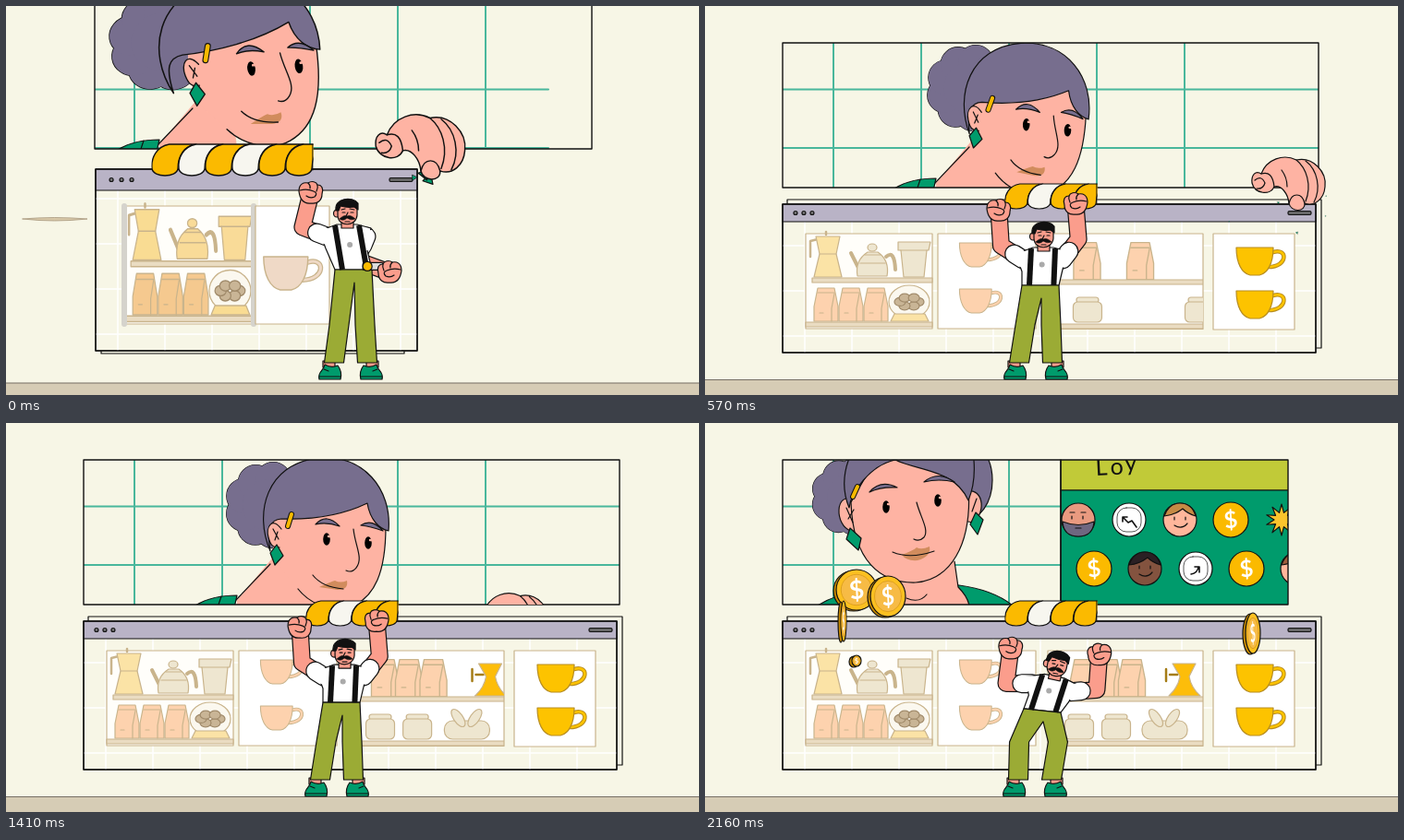
Recreate the animation shown at these times as an HTML page. Size 750 by 422 pixels, loop 2190 ms.

```html
<!DOCTYPE html>
<html lang="en">
<head>
<meta charset="utf-8">
<title>Shop dance</title>
<style>
html, body { margin: 0; width: 100%; height: 100%; overflow: hidden; background: #f7f6e6; }
svg { display: block; width: 100vw; height: 100vh; }
text { stroke: none; font-family: Lato, sans-serif; }
</style>
</head>
<body>
<svg id="stage" viewBox="0 0 750 422" fill="none" stroke="#111" stroke-width="1.2" stroke-linejoin="round" stroke-linecap="round"></svg>
<script>
const LOOP = 2190, STEP = 30, SETTLED = 570, BEAT = 435;
const CREAM = '#f7f6e6', SKIN = '#feb3a3', HAIR = '#776e8e', GREEN = '#009b6c', GOLD = '#fbba00';
const TAN = '#c9b48c', SAND = '#eee6d0', PEACH = '#fdd2ae', MAN = '#fb9d8c';

const clamp = v => Math.max(0, Math.min(1, v));
const ease = v => { v = clamp(v); return v * v * (3 - 2 * v); };
const mix = (a, b, u) => a + (b - a) * u;
const mixAll = (a, b, u) => a.map((v, i) => mix(v, b[i], u));

// The opening zoom-out: everything travels from its first to its resting place.
const zoom = (t, power = 3.3) => clamp(1 - t / SETTLED) ** power;
const land = (t, from, to) => mix(to, from, zoom(t));
const landAll = (t, from, to) => mixAll(to, from, zoom(t));

const path = (d, fill = 'none', more = '') => `<path d="${d}" fill="${fill}" ${more}/>`;
const at = (x, y, body, more = '') => `<g transform="translate(${x} ${y}) ${more}">${body}</g>`;
const box = (x, y, r, b, fill, more = '') =>
  `<rect x="${x}" y="${y}" width="${Math.max(0, r - x)}" height="${Math.max(0, b - y)}" fill="${fill}" ${more}/>`;
const oval = (x, y, rx, ry, fill, more = '') =>
  `<ellipse cx="${x}" cy="${y}" rx="${rx}" ry="${ry}" fill="${fill}" ${more}/>`;
const clip = (id, x, y, r, b, body) =>
  `<clipPath id="${id}">${box(x, y, r, b, '#000')}</clipPath><g clip-path="url(#${id})">${body}</g>`;
const poly = (pts, fill) => path('M' + pts.join('L') + 'Z', fill);
const repeat = (n, draw) => Array.from({ length: n }, (_, i) => draw(i)).join('');
const bare = 'stroke="none"';

/* ---------- woman ---------- */
const bun = (x, y, ring, r) => ['', bare].map(edge => repeat(9, i =>
  oval(x + ring * Math.cos(i * .7), y + ring * Math.sin(i * .7), r, r, HAIR, edge))).join('') + oval(x, y, ring, ring, HAIR, bare);
const eye = (x, y) => oval(x, y, 3.8, 6.8, '#000', bare) + path(`M${x + 2} ${y - 3}h4`, 'none', `stroke="${SKIN}" stroke-width="2.4"`);
const hairClip = d => path(d, 'none', 'stroke-width="6"') + path(d, 'none', `stroke="${GOLD}" stroke-width="4"`);
const lips = d => path(d, '#d18c5d', bare);

const profileHead = stretch => {
  const hair = body => `<g transform="translate(412 0) scale(${stretch} 1) translate(-412 0)">${body}</g>`;
  return hair(bun(282, 92, 28, 19)) +
    path('M286 120C284 60 408 60 409 115C409 165 397 192 372 202C350 211 325 197 313 182L288 152Z', SKIN, bare) +
    path('M409 115C409 165 397 192 372 202C350 211 325 197 314 183') +
    hair(path('M284 142C266 100 280 48 335 41C385 36 416 75 412 120C402 118 392 108 389 90C360 104 325 108 296 107C284 108 280 116 284 142Z', HAIR)) +
    path('M296 118C286 104 279 116 282 127C284 135 287 139 294 138', SKIN) + path('M287 118L293 129M292 121L289 130') +
    path('M284 144L291 135L298 147L289 157Z', GREEN) + hairClip('M303 115L307 102') +
    path('M333 113Q345 100 359 115Q345 110 333 113Z', HAIR) + path('M382 114Q394 106 406 120Q392 115 382 114Z', HAIR) +
    eye(345, 129) + eye(390, 133) + path('M374 118C376 137 385 150 377 160Q372 166 366 163') +
    lips('M337 181Q350 175 354 174Q360 177 367 174Q369 184 357 184Z') + path('M330 168Q340 181 363 183');
};

function profileWoman(t) {
  const slow = zoom(t, 1.7), leave = ease((t - 1560) / 330);
  const x = mix(291, 205, slow) - 31 * leave, y = land(t, 96, 143) + 11 * leave;
  const turn = mix(2 + 2 * Math.cos((t - 800) / 191), -8, slow) - 7 * leave;
  return at(-84 * slow + 13 * leave, land(t, -42, 0) + 12 * leave,
    path('M292 142L250 192V205H335L330 160Z', SKIN, bare) + path('M286 153L249 192') +
    path('M205 198Q222 187 250 187L246 205H205Z', GREEN) + path('M233 188L229 200')) +
    at(x, y, profileHead(1 + .12 * slow), `rotate(${turn}) scale(${land(t, 1.14, 1) - .04 * leave}) translate(-289 -146)`);
}

const frontWoman =
  bun(157, 80, 25, 17) + oval(280, 62, 31, 44, HAIR) +
  path('M122 198Q140 186 166 184L215 172L275 176Q312 181 333 198Z', GREEN) +
  path('M172 198Q178 182 208 176L212 150H270L274 178Q284 188 286 198Z', SKIN, bare) +
  path('M270 150L274 178Q284 188 286 198M218 190Q232 196 240 186') +
  path('M162 84C140 72 140 112 158 117L170 118', SKIN) + path('M280 76C300 66 306 96 290 108L280 106', SKIN) +
  path('M158 86C160 150 190 174 228 173C264 170 290 135 285 66L250 30H190Z', SKIN) +
  path('M156 92C158 76 178 46 206 40C230 52 270 50 285 84Q296 58 288 20H165Q142 58 156 92Z', HAIR) +
  path('M153 92l7 16M161 94l-6 10M294 82l-5 14') +
  path('M153 126L157 114L169 125L166 138Z', GREEN) + path('M287 110L293 97L301 105L295 121Z', GREEN) + hairClip('M160 80L165 69') +
  path('M178 75Q190 61 208 70Q190 69 178 75Z', HAIR) + path('M237 64Q252 51 270 64Q253 60 237 64Z', HAIR) +
  eye(196, 91) + eye(252, 84) + path('M229 86C233 102 243 116 237 124Q232 129 226 126') +
  lips('M213 143Q226 138 229 135Q234 138 243 134Q245 145 230 149Q218 150 213 143Z') + path('M203 140Q222 148 248 139');

/* ---------- loyalty panel ---------- */
const dollar = size => `<text text-anchor="middle" y="${size * .35}" font-size="${size}" font-weight="700" fill="#fff" transform="rotate(-8)">$</text>`;
const flatCoin = oval(0, 0, 19, 19, GOLD) + dollar(25);
const face = (skin, hair, beard) => oval(0, 0, 18, 18, skin) +
  path(beard ? 'M-17 2Q0 9 17 2Q16 18 0 18Q-16 18 -17 2Z' : 'M-17 -4Q-12 -18 0 -18Q13 -18 17 -4Q8 -7 3 -12Q-6 -5 -17 -4Z', hair) +
  path(beard ? 'M-7 -4v3M5 -4v3M-9 -8h5M3 -8h5M-3 9h6' : 'M-6 -3v3M6 -3v3M-6 6Q2 11 8 4');
const bubble = d => oval(0, 0, 18, 18, '#fff') + box(-13, -13, 13, 13, 'none', 'rx="10" stroke-width=".7"') + path(d, 'none', 'stroke-width="1.6"');
const star = poly(Array.from({ length: 20 }, (_, i) => {
  const a = i * Math.PI / 10, r = i % 2 ? 8 : 17;
  return [r * Math.sin(a), -r * Math.cos(a)];
}), '#fbc42c');
const icons = [
  [face('#e99a80', '#6f6780', true), bubble('M-7 -3L-1 3L3 1L8 8M-7 2v-5h5'), face('#ffb69b', '#c58a45'), flatCoin, star],
  [flatCoin, face('#83533f', '#2a2024'), bubble('M-5 6Q2 5 3 -2M4 4v-6h-5'), flatCoin, face('#ffb69b', '#a05d3c')]
];

function panel(t, x) {
  const drift = (2160 - t) * .05;
  const letters = [...'Loyalty'].map((c, i) => {
    const y = 57 - 30 * (1 - ease((t - 1950 - i * 45) / 150));
    return `<text x="${x + 38 + i * 16}" y="${y}" font-size="25" fill="#111" transform="rotate(-3 ${x + 38} 57)">${c}</text>`;
  }).join('');
  return box(x, 30, 640, 73, '#c1ca38') + letters + box(x, 73, 640, 205, GREEN) +
    icons.map((row, r) => row.map((art, i) =>
      at(x + 19 + r * 17 + i * 55 + (r ? -drift : drift), 105 + r * 53, art)).join('')).join('');
}

/* ---------- upper window ---------- */
function upperWindow(t) {
  const [x, y, right, b] = landAll(t, [96, -70, 634, 155], [84, 40, 664, 197]);
  const r = right - 33 * ease((t - 1650) / 120);
  const front = t >= 1890;
  const squeeze = t > 1650 && !front ? (r - 84) / 580 : 1;
  const grid = repeat(5, i => `M${84 + (55 + i * 95) * squeeze} -70V200`);
  const reach = mix(587, 664, clamp(t / 240));
  const edge = 631 - 246 * ease((t - 1800) / 260);
  return clip('window', x, y, r, b,
    path(`${grid}M84 90.5H${reach}M84 154H${reach}`, 'none', 'stroke="#49b79c" stroke-width="2"') +
    (front ? at(30 * (1 - ease((t - 1890) / 210)), 0, frontWoman) : profileWoman(t)) +
    (edge < 631 ? panel(t, edge) : '')) +
    box(x, y, r, b, 'none', 'stroke-width="1.4"') +
    (edge < 631 ? path(`M${edge} 40V197`, 'none', 'stroke-width="1.4"') : '');
}

/* ---------- shop ---------- */
const cup = (x, y, size, fill, edge) => at(x, y,
  path('M14 -10C30 -15 30 6 9 6', 'none', `stroke="${edge}" stroke-width="4.5"`) +
  path('M14 -10C30 -15 30 6 9 6', 'none', `stroke="${fill}" stroke-width="2.5"`) +
  path('M-26 -15H14C14 2 8 13 -1 15H-11C-20 13 -26 2 -26 -15Z', fill, `stroke="${edge}"`), `scale(${size})`);
const bag = (x, y, size, fill = PEACH) => at(x, y,
  path('M-9 -36H9L13 -16V0H-13V-16Z', fill) + path('M-9 -31H9M-7 -9h4M9 -30L6 -14V0'), `scale(${size})`);
const jar = x => at(x, 343, box(-12, -27, 12, -21, SAND, 'rx="3"') + box(-15.5, -22, 15.5, 0, SAND, 'rx="5"'));
const shelf = (x, y, r) => box(x, y, r, y + 5, '#eadcc2');

function displayItems(t) {
  const tone = (warm, pale) => `color-mix(in srgb, ${warm} ${100 * clamp(1 - t / 210)}%, ${pale})`;
  const sand = tone('#f9db98', SAND), gold = tone('#f9dc93', '#fbe3a6'), paper = tone('#f5c98f', PEACH);
  return path('M122 253L114 255V272M131 248v-3', 'none', 'stroke-width="2.5"') +
    path('M120 250H146L142 269L148 294H118L124 269Z', gold) + path('M124 269H142') +
    path('M167 286L158 268M196 272Q205 264 206 286', 'none', 'stroke-width="4"') +
    path('M165 293Q162 276 176 267H187Q200 276 197 293Z', sand) + path('M168 279H195M173 270H190') + oval(181, 262, 5, 4, sand) +
    path('M209 256H244L242 265H240L237 294H215L212 265H209Z', sand) + path('M212 265H240') +
    repeat(3, i => bag(131 + i * 27, 342, 1, paper)) +
    oval(221, 321, 22, 18, '#fbf8ef') + path('M205 334H238L242 342H201Z', gold) +
    repeat(6, i => oval(221 + 10 * Math.cos(i * 1.05), 321 + 5 * Math.sin(i * 1.05), 6, 4.5, '#c9b596', 'stroke="#a08a6a"')) +
    shelf(116, 295, 246) + shelf(109, 343, 246);
}

function goods(t) {
  const [cx, cy, cr, cb] = landAll(t, [128, 217, 268, 345], [109, 247, 246, 350]);
  const [px, py, pr] = landAll(t, [270, 217, 350], [252, 247, 358]);
  const sx = land(t, 788, 371), sr = sx + 168, qx = land(t, 990, 550), qr = qx + 88;
  const glass = clamp(1 - t / 210);
  // Goods arrive one after another, each gliding to rest.
  const arrive = (i, distance) => sx - 371 + distance * Math.exp((270 + 300 * i - t) / 130);
  const pot = path('M-14 -24H-6M-18 -30V-17', 'none', 'stroke="#a57d17" stroke-width="2.5"') +
    path('M-11 -36H14L7 -22Q9 -10 19 -1H-15Q-5 -10 -3 -22Z', '#fdbd0a');
  const bowl = box(-24, -20, 25, 0, SAND, 'rx="9"') + [-1, 1].map(s => oval(s * 9, -23, 5, 11, SAND, `transform="rotate(${s * 35} ${s * 9} -23)"`)).join('');
  const stock = repeat(3, i => bag(410 + i * 26 + arrive(i, 35), 297, 1.12)) + at(517 + arrive(3, 35), 297, pot) +
    repeat(2, i => jar(405 + i * 40 + arrive(i, 90))) + at(497 + arrive(2, 90), 343, bowl);
  return `<g stroke="${TAN}">` +
    box(cx, cy, cr, cb, '#fffefa') + at(cx, cy, displayItems(t), `scale(${(cr - cx) / 137} ${(cb - cy) / 103}) translate(-109 -247)`) +
    path(`M${cx} ${cy}V${cb}M${cr} ${cy}V${cb}`, 'none', `stroke="#d5d3cc" stroke-width="6" opacity="${glass}"`) +
    box(px, py, pr, 350 - 5 * glass, '#fff') +
    clip('cups', px, py, pr, 350, cup(land(t, 305, 298), land(t, 110, 270), .87, PEACH, TAN) +
      cup(land(t, 310, 298), land(t, 290, 320), land(t, 1.2, .87), glass > .3 ? '#efd9c6' : PEACH, TAN)) +
    box(sx, py, sr, 350.5, '#fff') +
    clip('stock', sx, py, sr, 351, stock + shelf(sx, 297, sr) + shelf(sx, 345, sr)) +
    box(qx, py, qr, 351, '#fff') +
    repeat(2, i => cup((qx + qr) / 2 + 7, 277 + i * 47, 1, '#fdc300', '#b78d20')) + '</g>';
}

function shop(t) {
  const [x, y, r, b, h] = landAll(t, [97, 177, 445, 374, 23], [84, 215, 661, 376, 19]);
  const [kx, ky, kr, kb] = landAll(t, [103, 180, 431, 377], [89, 210, 667, 371]);
  const tiles = repeat(12, i => `M${x + 24 + i * 51} ${y}V${b}`) + repeat(4, i => `M${x} ${b - 18 - i * 49}H${r}`);
  const gap = land(t, 11, 9);
  return box(kx, ky, kr, kb, CREAM) + box(x, y, r, b, CREAM) +
    clip('shop', x, y, r, b, path(tiles, 'none', 'stroke="#fff" stroke-width="1.5"') + goods(t)) +
    box(x, y, r, y + h, '#b9b3c6') + repeat(3, i => oval(x + gap * (i + 1.55), y + h / 2, 2, 2, '#777')) +
    box(r - 30, y + h / 2 - 2, r - 5, y + h / 2 + 2, '#666', 'rx="1.5"') +
    box(x, y, r, b, 'none', 'stroke-width="1.4"');
}

function awning(t) {
  const [x, y, r, b, pitch] = landAll(t, [158, 150, 332, 184, 29], [325, 193, 424, 220, 24.8]);
  const lobe = 'M16 0C4 2 -1 12 0 21C1 29 23 29 24 21C24 10 30 1 41 0Z';
  const stripes = repeat(6, i => {
    const left = r - (6 - i) * pitch;
    const color = i === 1 || i === 3 ? '#f7f6ef' : GOLD;
    return x - left > .9 * pitch ? '' : at(left, y, path(lobe, color), `scale(${pitch / 24.8} ${(b - y) / 27})`);
  });
  return clip('awning', x - .6, y - 1, r + .6, b + 1, stripes + path(`M${r} ${y}V${b - 6}`));
}

/* ---------- hand and sparks ---------- */
const handArt =
  path('M-30 -10C-24 -26 -6 -32 8 -25C26 -29 41 -12 39 4C38 17 28 26 17 22C18 32 2 32 0 22C-1 12 -8 2 -16 4C-20 14 -37 12 -40 0C-41 -9 -36 -14 -30 -10Z', SKIN) +
  path('M-30 -10Q-18 -14 -16 4M-37 -3Q-30 -9 -26 0Q-28 7 -35 6M0 22C3 10 14 10 17 22M8 -25C19 -16 25 2 18 20M18 -24C31 -14 35 6 27 21M-8 -14Q-2 -6 -2 4');

function hand(t) {
  const out = ease((t - 700) / 1000);
  const x = land(t, 449, 632) - 105 * out;
  const y = land(t, 152, 192) - 100 * out * (1 - out) + 58 * out * out;
  const sparks = repeat(5, i => {
    const a = i * 1.26 + .3, reach = (18 + i % 3 * 12) * (.4 + t / 400);
    return at(x + 8 + reach * Math.cos(a), y + 32 + reach * .4 * Math.sin(a), path('M-1 -.8L1 -.5L-.2 1Z', GREEN, 'stroke-width=".2"'),
      `rotate(${i * 70 + t / 4}) scale(${(3 + i % 2 * 3) * clamp((630 - t) / 300)})`);
  });
  return (t < 630 ? sparks : '') + clip('hand', 0, 0, 750, t < 960 ? 422 : 197, at(x, y, handArt, `scale(${land(t, 1.22, 1)})`));
}

/* ---------- man ---------- */
// head x y, tilt, hips x y, left fist x y, right fist x y, left foot x, knee bend
const STAND = [369, 224, 0, 376, 286, 330, 203, 415, 289, 351, 0];
const UP = [366, 249, 0, 363, 303, 318, 222, 401, 215, 336, 0];
const DOWN = [381, 262, 12, 365, 310, 331, 245, 427, 252, 335, 7];

function manPose(t) {
  if (t < SETTLED) {
    const pose = mixAll(STAND, UP, ease(t / 270));
    pose[10] = 8 * Math.sin(Math.PI * t / SETTLED);
    return pose;
  }
  const beat = ((t - SETTLED) / BEAT) % 1;
  return mixAll(UP, DOWN, beat < .7 ? ease((beat - .12) / .57) : 1 - ease((beat - .72) / .22));
}

function elbow(shoulder, hand, side) {
  const upper = 28, fore = 38, dx = hand[0] - shoulder[0], dy = hand[1] - shoulder[1];
  const d = Math.hypot(dx, dy), a = (upper ** 2 - fore ** 2 + d * d) / (2 * d);
  const h = side * Math.sqrt(Math.max(0, upper ** 2 - a * a));
  return [shoulder[0] + (dx * a - dy * h) / d, shoulder[1] + (dy * a + dx * h) / d];
}

const tube = (pts, width, fill) => ['#111', fill].map((c, i) =>
  path('M' + pts.join('L'), 'none', `stroke="${c}" stroke-width="${width - i * 2.4}"`)).join('');
const fist = ([x, y], flip) => at(x, y,
  path('M-13 -2C-13 -10 -8 -12 -3 -11C1 -14 6 -12 7 -9C12 -9 14 -4 12 1C12 8 7 12 0 11C-8 12 -12 6 -13 -2Z', MAN) +
  path('M-12 -3Q-4 -5 3 -2Q8 0 4 4Q-1 6 -5 3M-3 -11Q0 -8 -1 -5M7 -9Q8 -6 6 -2'), `scale(${flip} 1)`);
const manHead =
  path('M-6 6V17H7V6Z', MAN) + oval(-11, 1, 3.5, 4, MAN) +
  path('M-10 -8V3C-10 16 10 16 11 3V-8Z', MAN) +
  path('M-12 -2C-14 -16 6 -18 12 -10L12 -3L8 -6Q0 -5 -7 -7L-9 -2Z', '#111') +
  path('M-6 -3l4 -1M3 -4l5 1M-5 0h3M4 0h3M1 0l-2 4M-2 10h5') +
  path('M-8 7Q-3 2 0 4Q4 2 9 7Q4 9 0 6Q-4 10 -8 7Z', '#111', 'stroke-width=".6"');
const shoe = (x, flip) => at(x, 405,
  path('M-8 -20V-13H5V-20Z', MAN) +
  path('M-12 0C-14 -9 -7 -9 -6 -16Q1 -12 8 -15C12 -10 12 -4 11 0Z', GREEN) + path('M-12 -3H11M-7 -11l5 2'), `scale(${flip} 1)`);

function trousers(hx, hy, foot, bend) {
  const leg = side => {
    const cuff = foot + (side < 0 ? 4 : 40), knee = (hx + side * 10 + cuff) / 2 + side * bend;
    const edge = s => [[knee + s * 10.5, 346], [cuff + s * 10.5, 387]];
    return [...edge(side), ...edge(-side).reverse()];
  };
  return [[hx - 20, hy], [hx + 20, hy + bend * .6], ...leg(1), [hx + 1, hy + 14], ...leg(-1).reverse()];
}

function man(t) {
  const [x, y, tilt, hx, hy, lx, ly, rx, ry, foot, bend] = manPose(t);
  const a = tilt * Math.PI / 180, cos = Math.cos(a), sin = Math.sin(a);
  const body = (u, v) => [x - 13 * sin + u * cos - v * sin, y + 13 * cos + u * sin + v * cos];
  const legs = trousers(hx, hy, foot, bend);
  const torso = [body(-11, 0), body(11, 0), body(26, 4), body(21, 24), legs[1], legs[0], body(-23, 26), body(-30, 7)];
  const along = (p, q, u) => mixAll(p, q, u);
  const strap = (u, v) => path('M' + body(u, 1) + 'L' + along(legs[0], legs[1], v), 'none', 'stroke-width="6" stroke-linecap="butt"');
  const arms = [[body(-22, 13), [lx, ly], -1], [body(21, 13), [rx, ry], 1]].map(([s, f, side]) => ({ s, f, e: elbow(s, f, side) }));
  const mark = along(body(0, 0), [hx, hy], .45);
  const watch = along(arms[1].e, arms[1].f, .5);
  return shoe(foot, 1) + shoe(foot + 44, -1) +
    arms.map(({ s, e, f }) => tube([s, e, f], 19, MAN) + tube([s, along(s, e, .4)], 21, '#fff')).join('') +
    poly(torso, '#fff') + poly(legs, '#9bab35') +
    arms.map(({ s, e }) => path('M' + s + 'L' + along(s, e, .3), 'none', 'stroke="#fff" stroke-width="17"')).join('') +
    strap(-13, .2) + strap(13, .86) + oval(mark[0], mark[1], 3, 3, '#aaa', bare) +
    (t < 120 ? at(watch[0], watch[1], box(-11, -4, 11, 4, '#ddd', 'rx="2"') + oval(-6, 0, 5, 5, GOLD)) : '') +
    fist(arms[0].f, 1) + fist(arms[1].f, -1) + at(x, y, manHead, `rotate(${tilt})`);
}

/* ---------- coins ---------- */
function coin(t, x, y, width, r, i) {
  const left = 2160 - t;
  const w = Math.max(2, r * Math.abs(Math.cos(Math.acos(width / r) + left / (150 + i * 20))));
  return at(x, y - left * (.75 + i * .06),
    oval(-3, 1, w, r, '#c98b00') + oval(0, 0, w, r, '#fcc021') +
    oval(0, 0, w * .76, r * .76, '#f7bb45', 'stroke="#d79a18" stroke-width=".8"') +
    at(0, 0, dollar(r * 1.25), `scale(${w / r} 1)`));
}

function coins(t) {
  if (t < 1950) return '';
  return clip('coins', 0, 40, 750, 422,
    coin(t, 164, 181, 22, 22, 0) + coin(t, 198, 188, 19, 22, 1) + coin(t, 150, 215, 3, 22, 2) +
    coin(t, 593, 228, 8, 22, 3) + coin(t, 164, 258, 5, 6, 4));
}

function scene(t) {
  return box(0, 0, 750, 422, CREAM, bare) +
    box(-2, land(t, 409, 405.5), 752, 430, '#d6ccb5', 'stroke="#766e65"') +
    (t < 60 ? path('M18 231Q52 228 88 231Q52 235 18 231Z', '#d9c9a9', 'stroke="#a8977d" stroke-width=".8"') : '') +
    upperWindow(t) + shop(t) + awning(t) + hand(t) + man(t) + coins(t);
}

const stage = document.getElementById('stage');
const start = performance.now();
let shown = -1;
function draw() {
  const t = Math.floor(((performance.now() - start) % LOOP) / STEP) * STEP;
  if (t !== shown) stage.innerHTML = scene(shown = t);
  requestAnimationFrame(draw);
}
draw();
</script>
</body>
</html>
```
